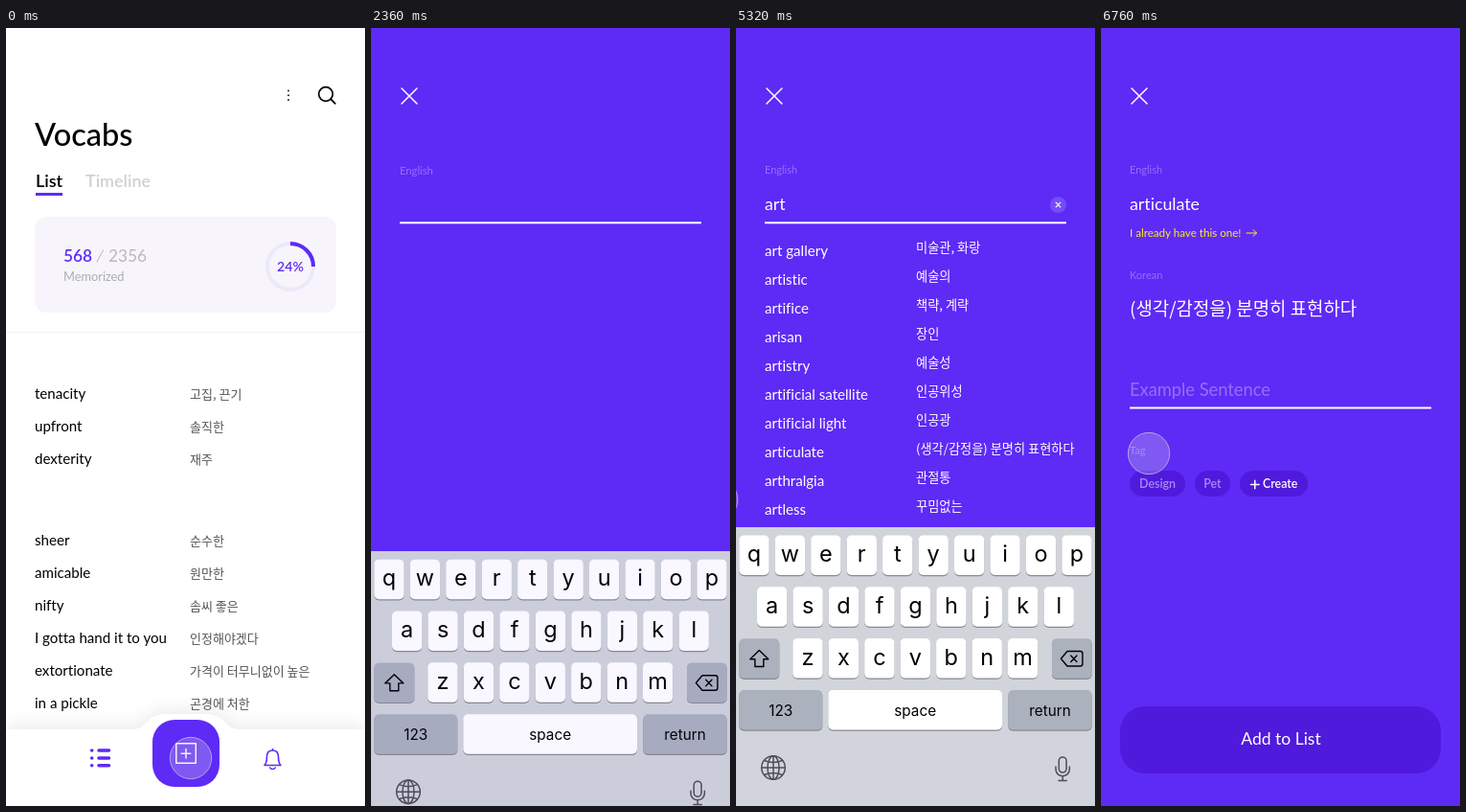
Write an HTML page that moves like this. It is 375x812 px and loops after 8000 ms.

```html
<!DOCTYPE html>
<html lang="en">
<head>
<meta charset="utf-8">
<title>Vocabs</title>
<style>
:root { --violet: #5e2af6; --deep: #501add; }
html, body { margin: 0; width: 100%; height: 100%; overflow: hidden; background: #fff; }
svg { display: block; width: 375px; height: 812px; font-family: Lato, sans-serif; font-variant-ligatures: none; }
.ko { font-family: "Noto Sans CJK KR", "Noto Sans CJK", "Noto Sans", sans-serif; font-weight: 300; font-size: 13px; }
.white .ko { font-size: 13.2px; }
.word { font-size: 15.1px; }
.input { font-size: 17.8px; }
.label { font-size: 11px; }
.hint { font-size: 18.3px; }
.label, .hint { fill: #fff; fill-opacity: .33; }
.chip { font-size: 12.4px; font-weight: 600; }
.white { fill: #fff; }
.line { fill: none; stroke-linecap: round; stroke-linejoin: round; }
.mid { text-anchor: middle; }
#keys text { font-family: Inter, "Noto Sans", sans-serif; text-anchor: middle; fill: #000; }

/* One loop is 8 s, so 1% is 80 ms. */
.home, .nav, .icon, .sheet, .field, .touch, .float, .found, .done { animation: 8s infinite both; }
.home { animation-name: home; }
.nav { animation-name: nav; }
.icon { animation-name: icon; }
.sheet { animation-name: sheet; }
.field { animation-name: field; }
.touch { animation-name: touch; }
.float { animation-name: float; }
.found { animation-name: found; }
.done { animation-name: done; }
#keys { animation: slide 8s infinite, fade 8s infinite; }
.rule { animation: rule 8s step-end infinite; }
.first { animation: first 8s step-end infinite; }
.second { animation: second 8s step-end infinite; }
.detail { animation: detail 8s step-end infinite; }
.pressed { animation: pressed 8s step-end infinite; }

@keyframes home { 0%, 11.75% { opacity: 1; } 14.75%, 100% { opacity: 0; } }
@keyframes nav { 0%, 11.75% { opacity: 1; animation-timing-function: ease-out; } 17.5%, 100% { opacity: 0; } }
@keyframes icon { 0%, 11.75% { opacity: 1; } 14.75%, 100% { opacity: 0; } }
@keyframes sheet {
  0%, 14.9% { x: 153px; y: 722px; width: 70px; height: 70px; rx: 23px; animation-timing-function: ease-in-out; }
  18.75%, 100% { x: 0; y: 0; width: 375px; height: 812px; rx: 0; }
}
@keyframes field { 0%, 17.25% { opacity: 0; } 18.75%, 100% { opacity: 1; } }
@keyframes touch {
  0%, 14.9% { transform: translate(193px, 762px); animation-timing-function: ease-in; }
  18.75% { transform: translate(145px, 835px); animation-timing-function: step-end; }
  66.25% { transform: translate(-24px, 495px); animation-timing-function: ease-out; }
  74%, 100% { transform: translate(50px, 444px); }
}
@keyframes float {
  0%, 21.25% { transform: translate(30px, 190px) scale(1); animation-timing-function: ease-in-out; }
  30.75%, 100% { transform: translate(30px, 152px) scale(.6); }
}
@keyframes slide {
  0%, 21.25% { transform: translateY(291px); animation-timing-function: cubic-bezier(.5, 0, .65, 1); }
  31.25%, 75.5% { transform: none; animation-timing-function: ease-in-out; }
  84%, 100% { transform: translateY(291px); }
}
@keyframes fade {
  0%, 21.25% { opacity: 0; animation-timing-function: ease-in-out; }
  30.75%, 75.5% { opacity: 1; animation-timing-function: ease-in-out; }
  84%, 100% { opacity: 0; }
}
@keyframes found {
  0%, 31.5% { opacity: 0; transform: translateY(24px); animation-timing-function: ease-out; }
  36%, 100% { opacity: 1; transform: none; }
}
@keyframes done { 0%, 82% { opacity: 0; } 84.5%, 100% { opacity: 1; } }
@keyframes rule { 0% { opacity: 1; } 75.75% { opacity: 0; } }
@keyframes first { 0% { opacity: 0; } 31.75% { opacity: 1; } 40.75% { opacity: 0; } }
@keyframes second { 0% { opacity: 0; } 40.75% { opacity: 1; } 75.75% { opacity: 0; } }
@keyframes detail { 0% { opacity: 0; } 75.75% { opacity: 1; } }
@keyframes pressed { 0% { fill: #fff; } 75.75% { fill: #abb1bd; } }
</style>
</head>
<body>
<svg viewBox="0 0 375 812">
  <defs>
    <filter id="glow" x="-10%" y="-40%" width="120%" height="180%">
      <feDropShadow dx="0" dy="-4" stdDeviation="9" flood-color="#000" flood-opacity=".08"/>
    </filter>
  </defs>

  <g class="home">
    <g fill="#222"><circle cx="295" cy="65.500" r="1"/><circle cx="295" cy="70.300" r="1"/><circle cx="295" cy="75" r="1"/></g>
    <g class="line" stroke="#000" stroke-width="1.700"><circle cx="334" cy="69" r="7.300"/><path d="M339.400 74.400l4.400 4.400"/></g>
    <text x="30" y="123" font-size="32.500" font-weight="500">Vocabs</text>
    <g font-size="18" font-weight="600">
      <text x="31" y="166">List</text>
      <text x="83" y="166" fill="#d0d0d0">Timeline</text>
    </g>
    <rect x="31" y="172" width="28" height="3" fill="var(--violet)"/>
    <rect x="30" y="197" width="315" height="100" rx="12" fill="#f7f5fb"/>
    <g font-size="17.300">
      <text x="60" y="244" font-weight="600" fill="var(--violet)">568</text>
      <path class="line" d="M95 244l6.500-12" stroke="#b5b5b5"/>
      <text x="107" y="244" fill="#b8b8b8">2356</text>
    </g>
    <text x="60" y="264" font-size="12.800" fill="#adadb0">Memorized</text>
    <g fill="none" stroke-width="4">
      <circle cx="297" cy="249" r="24" stroke="#ece9fa"/>
      <path d="M297 225a24 24 0 0 1 24 24" stroke="var(--violet)"/>
    </g>
    <text class="mid" x="297" y="254" font-size="14.200" font-weight="600" fill="var(--violet)">24%</text>
    <path d="M0 317.500H375" stroke="#f2f2f3"/>
    <g id="vocabs"></g>
  </g>

  <g class="nav">
    <path filter="url(#glow)" fill="#fff" d="M0 732H134C147 732 146 716 170 716H206C230 716 229 732 242 732H375V830H0Z"/>
    <g fill="none" stroke="var(--violet)" stroke-linecap="round">
      <path stroke-width="3.600" d="M97 754h10.500M97 762h10.500M97 769.800h10.500M89.700 754h.01M89.700 762h.01M89.700 769.800h.01"/>
      <path stroke-width="1.600" stroke-linejoin="round" d="M270 769.500c2-2 2.500-4 2.500-9c0-4 2.300-6.500 6-6.500s6 2.500 6 6.500c0 5 .5 7 2.500 9zM278.500 754v-1.500M275.800 772c1 2 4.400 2 5.400 0"/>
    </g>
  </g>

  <rect class="sheet" fill="var(--violet)" x="153" y="722" width="70" height="70" rx="23"/>
  <g class="icon"><path class="line" stroke="#fff" stroke-width="1.500" d="M177.800 746.800h20.500v20.500h-20.500zM188 752.500v9.500M183.200 757.200h9.600"/></g>

  <g class="field">
    <path class="line" stroke="#fff" stroke-width="1.500" d="M32 63l16 16M48 63l-16 16"/>
    <text class="hint float">English</text>
    <rect class="rule white" x="30" y="202.300" width="315" height="2"/>
  </g>

  <g class="first">
    <text class="input white" x="30" y="190">a</text>
    <g id="early" class="found white"></g>
  </g>

  <g class="second">
    <text class="input white" x="30" y="190">art</text>
    <circle cx="336.500" cy="184.500" r="8.500" fill="#fff" fill-opacity=".16"/>
    <path class="line" stroke="#fff" stroke-width="1.200" d="M334.200 182.200l4.600 4.600M338.800 182.200l-4.600 4.600"/>
    <g id="later" class="white"></g>
  </g>

  <g class="detail">
    <text class="input white" x="30" y="190">articulate</text>
    <text x="30" y="218" font-size="11.600" fill="#ffee1a">I already have this one!</text>
    <path class="line" stroke="#ffee1a" d="M152 214h10.500M159 210.700l3.500 3.300l-3.500 3.300"/>
    <text class="label" x="30" y="262">Korean</text>
    <text class="ko white" x="30" y="300" style="font-size:18.900px">(생각/감정을) 분명히 표현하다</text>
    <text class="label" x="30" y="445">Tag</text>
    <g fill="var(--deep)">
      <rect x="30" y="462" width="58" height="27" rx="13.500"/>
      <rect x="98" y="462" width="37" height="27" rx="13.500"/>
      <rect x="145" y="462" width="71" height="27" rx="13.500"/>
    </g>
    <g class="chip" fill="#a78df6">
      <text class="mid" x="59" y="480">Design</text>
      <text class="mid" x="116.500" y="480">Pet</text>
      <text class="white" x="169" y="480">Create</text>
    </g>
    <path class="line" stroke="#fff" stroke-width="1.500" d="M156.500 476.500h8.500M160.750 472.200v8.500"/>
  </g>

  <g class="done">
    <text class="hint" x="30" y="384">Example Sentence</text>
    <rect class="white" x="30" y="395.500" width="315" height="2"/>
    <rect x="20" y="708" width="335" height="70" rx="26" fill="var(--deep)"/>
    <text class="mid white" x="188" y="748" font-size="17.500">Add to List</text>
  </g>

  <g id="keys">
    <rect y="521" width="375" height="291" fill="#d1d4da"/>
  </g>

  <circle class="touch" r="21.700" fill="#d8d2e4" fill-opacity=".28" stroke="#d0cbe0" stroke-opacity=".7"/>
</svg>

<script>
const $ = id => document.getElementById(id);

function fill(id, pairs, x, top, step, lift, shade) {
  $(id).innerHTML = pairs.map((pair, i) => {
    const [en, ko] = pair.split("|"), y = top(i, step);
    return `<text class="word" x="30" y="${y}">${en}</text>` +
      `<text class="ko" x="${x}" y="${y - lift}" fill="${shade}">${ko}</text>`;
  }).join("");
}

const grouped = (i, step) => 387 + i * step + (i > 2 ? 51 : 0);
const plain = (i, step) => 238 + i * step;

fill("vocabs", ["tenacity|고집, 끈기", "upfront|솔직한", "dexterity|재주", "sheer|순수한",
  "amicable|원만한", "nifty|솜씨 좋은", "I gotta hand it to you|인정해야겠다",
  "extortionate|가격이 터무니없이 높은", "in a pickle|곤경에 처한"], 192, grouped, 34, .5, "#555");

fill("early", ["about|~에 대하여", "above|~보다 위에", "accept|받아들이다", "active|활동적인",
  "advice|조언, 충고", "afford|~할 여유가 있다", "agree|동의하다", "allow|허락하다",
  "amount|총액, 양", "answer|대답"], 188, plain, 30, 4, "#fff");

fill("later", ["art gallery|미술관, 화랑", "artistic|예술의", "artifice|책략, 계략", "arisan|장인",
  "artistry|예술성", "artificial satellite|인공위성", "artificial light|인공광",
  "articulate|(생각/감정을) 분명히 표현하다", "arthralgia|관절통", "artless|꾸밈없는"],
  188, plain, 30, 4, "#fff");

function key(x, y, w, text = "", dark = false, size = 23.5) {
  const look = text === "a" ? ' class="pressed"' : "";
  const base = y + (size > 20 ? 27.5 : 26.5);
  return `<rect x="${x}" y="${y + 1.2}" width="${w}" height="41.500" rx="5" fill="#898b91"/>` +
    `<rect${look} x="${x}" y="${y}" width="${w}" height="41.500" rx="5" fill="${dark ? "#abb1bd" : "#fff"}"/>` +
    `<text x="${x + w / 2}" y="${base}" font-size="${size}">${text}</text>`;
}

const rows = [["qwertyuiop", 3.3], ["asdfghjkl", 22], ["zxcvbnm", 59.3]];
const letters = rows.map(([chars, x], r) =>
  [...chars].map((c, i) => key(x + i * 37.45, 529.5 + r * 53.8, 31.3, c)).join("")).join("");

$("keys").innerHTML += letters +
  key(3.3, 637.2, 42, "", true) + key(330, 637.2, 41.7, "", true) +
  key(3.3, 691, 87, "123", true, 15.3) + key(96.3, 691, 181.7, "space", false, 15.3) +
  key(284.3, 691, 87.4, "return", true, 15.3) +
  `<g class="line" stroke="#000" stroke-width="1.400">
    <path d="M24.300 649.500l9.500 9.200h-5v7.800h-9v-7.800h-5z"/>
    <path d="M346 650.500h13.500a2.500 2.500 0 0 1 2.500 2.500v10.500a2.500 2.500 0 0 1-2.500 2.500H346l-6.500-7.750zM349.800 655l6.200 6.500M356 655l-6.200 6.500"/>
  </g>
  <g class="line" stroke="#4c4f55" stroke-width="1.500">
    <circle cx="39" cy="772" r="12.300"/>
    <ellipse cx="39" cy="772" rx="6" ry="12.300"/>
    <path d="M39 759.700v24.600M26.700 772h24.600M29.500 764.500q9.500 4 19 0M29.500 779.500q9.500-4 19 0"/>
    <rect x="337.300" y="761" width="7.800" height="16" rx="3.900"/>
    <path d="M334 771v2.500c0 9.500 14.400 9.500 14.400 0V771M341.200 780.800v4.500M337 785.400h8.400"/>
  </g>`;
</script>
</body>
</html>
```
